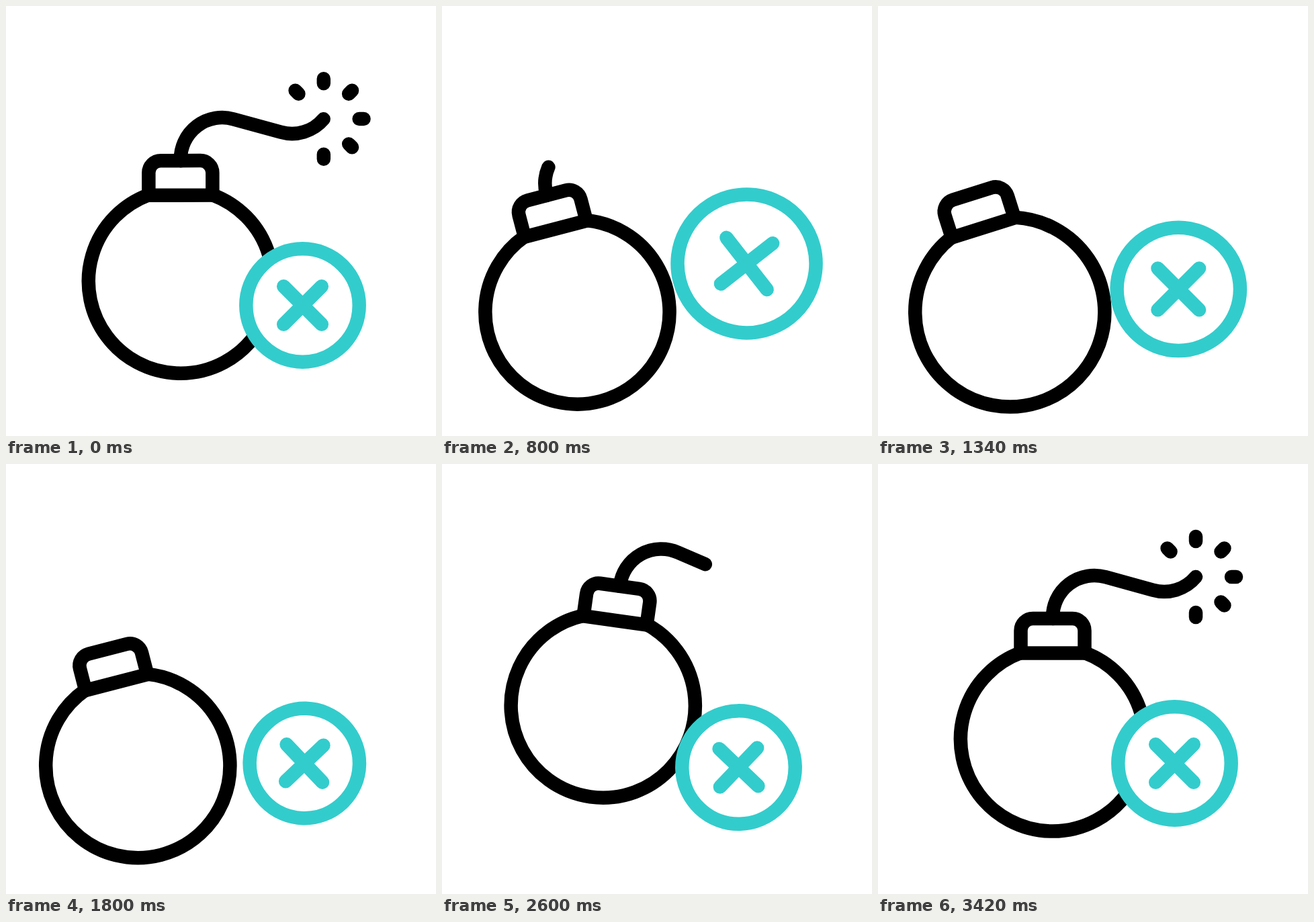
Write an HTML page that moves like this. It is 640x640 px and loops after 3.6 s.

```html
<!DOCTYPE html>
<html lang="en">
<head>
<meta charset="utf-8">
<title>Bomb</title>
<style>
  html, body { margin: 0; height: 100%; overflow: hidden; background: #fff; }
  svg { display: block; width: 100vw; height: 100vh; fill: none; stroke-width: 20.5; }
  #bomb { stroke: #000; }
  #badge { stroke: #3cc; }
  #fuse, #sparks, #cross { stroke-linecap: round; }
  .fixed { vector-effect: non-scaling-stroke; }
</style>
</head>
<body>
<svg viewBox="0 0 640 640">
  <g id="bomb">
    <path class="fixed" d="M47.5-128.6A137.1 137.1 0 1 1-47.5-128.6"/>
    <path class="fixed" d="M-47.5-128V-161.5a18 18 0 0 1 18-18h59a18 18 0 0 1 18 18V-128Z"/>
    <path id="fuse" pathLength="1" d="M0-179.5V-181.5A62 62 0 0 1 78.5-241.3L149-221.9A61.2 61.2 0 0 0 213-241.5"/>
    <g id="sparks"></g>
  </g>
  <g id="badge">
    <circle class="fixed" r="84.2" fill="#fff"/>
    <path id="cross" class="fixed" d="M-28.3-28.3 28.3 28.3M28.3-28.3-28.3 28.3"/>
  </g>
</svg>
<script>
const LOOP = 3600;
const el = id => document.getElementById(id);

// Progress of a move from time a to time b: even, eased at both ends, eased at its end.
const ramp = (t, a, b) => Math.min(1, Math.max(0, (t - a) / (b - a)));
const ease = (t, a, b) => { const u = ramp(t, a, b); return u * u * (3 - 2 * u); };
const easeOut = (t, a, b) => Math.sin(ramp(t, a, b) * Math.PI / 2);
// There and back again between a and b.
const bump = (t, a, b) => Math.sin(ramp(t, a, b) * Math.PI) ** 2;

function place(id, x, y, turn, size) {
  el(id).setAttribute('transform', `translate(${x} ${y}) rotate(${turn}) scale(${size})`);
}

function show(id, visible) {
  el(id).setAttribute('visibility', visible ? 'visible' : 'hidden');
}

function drawBomb(t) {
  const roll = easeOut(t, 0, 1080), drop = easeOut(t, 0, 540);
  const swell = bump(t, 800, 1540);
  const lean = ease(t, 1800, 2170), back = ease(t, 2162, 2815);
  const leap = ease(t, 1681, 2491), land = ease(t, 2409, 3075);
  place('bomb',
    260 - 63.7 * roll - 16.8 * lean + 80.5 * back,
    409.5 + 46 * drop - 108.5 * leap + 62.5 * land,
    -16 * roll - 2.8 * swell + 26 * leap - 10 * land,
    1 + 0.0515 * swell);

  const fuse = 1 - ramp(t, 0, 960) + ramp(t, 1890, 3042);
  el('fuse').setAttribute('stroke-dasharray', `${fuse} 2`);
  show('fuse', fuse > 0.002);

  const spark = 1 - ramp(t, 0, 240) + ramp(t, 2690, 2760);
  place('sparks', 213, -241.5, 0, spark);
  show('sparks', spark > 0.01);
}

function drawBadge(t) {
  const grow = ease(t, 0, 1100), shrink = ease(t, 1080, 1536);
  const crouch = bump(t, 0, 1120), tilt = bump(t, 320, 1280);
  const jump = ease(t, 640, 1000) - ease(t, 1000, 1436);
  const rock = bump(t, 1400, 2200);
  const dip = bump(t, 2052, 2748), rebound = bump(t, 2740, 3300);
  place('badge',
    441.5 + 14.7 * (grow - shrink) + 2.8 * rock - rebound,
    445.5 + 35 * crouch - 198 * jump + 16 * dip - 4.7 * rebound,
    7 * tilt + 1.5 * rock - 3.5 * dip,
    1 + 0.273 * grow - 0.303 * shrink + 0.03 * ease(t, 1800, 2240));
}

el('sparks').innerHTML = [-135, -90, -45, 0, 45, 90]
  .map(a => `<path d="M53 0H60" transform="rotate(${a})"/>`).join('');

function draw() {
  const t = performance.now() % LOOP;
  drawBomb(t);
  drawBadge(t);
  requestAnimationFrame(draw);
}
draw();
</script>
</body>
</html>
```
